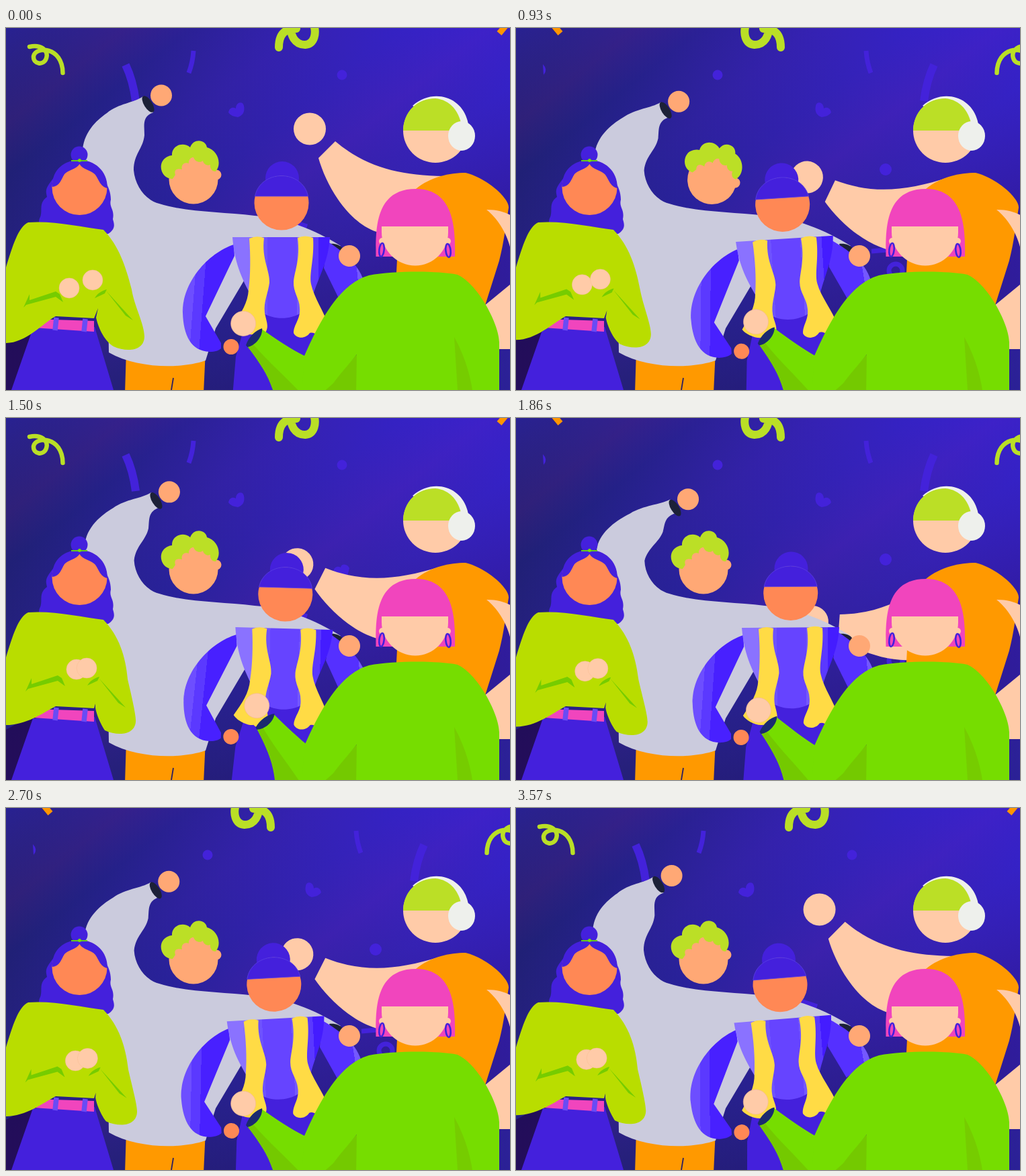
These frames come from a looping animation (750 by 540 pixels, 3.6 s). An HTML page:

```html
<!DOCTYPE html>
<html lang="en">
<head>
<meta charset="utf-8">
<title>Party crowd</title>
<style>
  html, body { margin: 0; width: 100%; height: 100%; overflow: hidden; background: #2c218c; }
  svg { display: block; width: 750px; height: 540px; }
</style>
</head>
<body>
<svg viewBox="0 0 750 540">
  <defs>
    <linearGradient id="sky" gradientUnits="userSpaceOnUse" x1="80" y1="400" x2="700" y2="0">
      <stop offset="0" stop-color="#20206c"/>
      <stop offset=".28" stop-color="#26218a"/>
      <stop offset=".5" stop-color="#3121a0"/>
      <stop offset=".75" stop-color="#3722b8"/>
      <stop offset="1" stop-color="#3622d0"/>
    </linearGradient>
    <linearGradient id="rays" gradientUnits="userSpaceOnUse" x1="0" y1="0" x2="540" y2="675">
      <stop offset="0" stop-color="#2c22a0" stop-opacity=".5"/>
      <stop offset=".07" stop-color="#37228a" stop-opacity=".35"/>
      <stop offset=".13" stop-color="#42207a" stop-opacity=".4"/>
      <stop offset=".2" stop-color="#1f2080" stop-opacity=".35"/>
      <stop offset=".32" stop-color="#3322b0" stop-opacity=".3"/>
      <stop offset=".42" stop-color="#2e22c4" stop-opacity=".25"/>
      <stop offset=".52" stop-color="#4b20b8" stop-opacity=".35"/>
      <stop offset=".62" stop-color="#3020a0" stop-opacity=".2"/>
      <stop offset=".8" stop-color="#220850" stop-opacity=".3"/>
      <stop offset="1" stop-color="#1c2070" stop-opacity=".4"/>
    </linearGradient>
    <linearGradient id="vest" gradientUnits="userSpaceOnUse" x1="337" y1="0" x2="482" y2="0"></linearGradient>
    <linearGradient id="sleeveL" gradientUnits="userSpaceOnUse" x1="263" y1="0" x2="341" y2="6"></linearGradient>
    <linearGradient id="sleeveR" gradientUnits="userSpaceOnUse" x1="474" y1="0" x2="534" y2="-6"></linearGradient>
  </defs>

  <rect width="750" height="540" fill="url(#sky)"/>
  <rect width="750" height="540" fill="url(#rays)"/>
  <path fill="#220950" opacity=".8" d="M0 465L45 440V540H0Z"/>

  <g id="confetti" fill="none" stroke-linecap="round">
    <g stroke="#badf26">
      <path stroke-width="6.5" d="M35 28C51 24 64 33 60 45C56 57 40 54 41 42C44 27 84 27 84.5 67"/>
      <path stroke-width="12" d="M406 29C406 10 414 1 432 1M425 -8C421 12 431 25 445 25C459 24 463 8 457 -8"/>
    </g>
    <path stroke="#ff9500" stroke-width="9" stroke-linecap="butt" d="M734 8L744 -4"/>
    <g stroke="#4322da" stroke-linecap="butt">
      <path stroke-width="12" d="M178 55Q189 78 193 109"/>
      <path stroke-width="7" d="M279 34Q278 51 272 67"/>
      <path stroke-width="7" d="M248 331L271 333M424 288L448 296"/>
      <circle cx="235" cy="362" r="10" stroke-width="7"/>
    </g>
    <g fill="#4322da">
      <circle cx="500" cy="70" r="7.5"/>
      <circle cx="250" cy="211" r="9"/>
      <path d="M331 126C332 119 338 117 342 120C342 111 352 108 354 116C356 125 352 131 345 133C338 132 334 130 331 126Z"/>
      <path d="M487 229C488 222 494 220 498 223C499 216 509 218 511 224L508 236H490Z"/>
      <path d="M760 54Q752 62 759 70Z"/>
    </g>
  </g>

  <!-- dancer with headphones -->
  <g id="wave" fill="#ffcba8">
    <path d="M490 169C535 207 585 220 652 221L670 300L575 308C518 308 478 240 465 194Z"/>
    <circle cx="452" cy="150.5" r="24"/>
  </g>
  <path fill="#ff9900" d="M610 240C632 222 660 216 684 216C716 224 749 254 748 268C744 292 741 320 734 347L711 420L700 480H575L582 345C590 310 598 262 610 240Z"/>
  <g fill="#ffcba8">
    <path d="M715 271C732 271 744 275 752 280V337C749 312 733 285 715 271ZM752 381L706 419V479H752Z"/>
    <circle cx="639" cy="153" r="48"/>
  </g>
  <path fill="#eef0ec" d="M605 116C620 102 640 99 655 104C675 110 687 128 689 150H668Z"/>
  <path fill="#bbdf26" d="M591 153C591 125 612 105 639 105C660 107 676 123 679 153Z"/>
  <ellipse cx="678" cy="161" rx="20" ry="22" fill="#eef0ec"/>

  <!-- grey jumper -->
  <path fill="#ff9900" d="M179 480L177 545H294L297 480Z"/>
  <path fill="none" stroke="#2b1f62" stroke-width="1.8" d="M249 522L246 540"/>
  <path id="jumper" fill="#cbcbdd"/>
  <path fill="#1c2138" d="M481 322C490 321 497 324 500 328L496 342L484 334Z"/>
  <g id="fist">
    <ellipse cx="211.5" cy="113.5" rx="6" ry="14" transform="rotate(-32 211.5 113.5)" fill="#1c2138"/>
    <circle cx="231" cy="100.5" r="16" fill="#ffa875"/>
  </g>
  <g id="nod">
    <g fill="#ffa875">
      <circle cx="279" cy="226" r="36.5"/>
      <circle cx="313" cy="219" r="7.5"/>
    </g>
    <path fill="#bbdf26" d="M248 225C233 226 226 207 234 197C237 193 243 190 247 190C246 175 264 169 274 178C279 164 297 166 299 178C315 182 322 203 312 214C305 214 303 207 304 204C298 207 293 201 293 198C288 202 281 199 279 193C275 192 271 198 272 202C265 199 260 205 262 211C252 208 250 214 252 219Z"/>
  </g>

  <!-- girl clapping -->
  <g fill="#4420dc">
    <circle cx="109" cy="189" r="12.5"/>
    <path d="M72 222C60 238 58 240 61 252C47 262 56 274 50 284C46 294 54 300 60 306L152 307C165 299 160 290 159 285C162 270 153 268 156 256C156 245 152 236 148 230Z"/>
    <path d="M40 448L8 540H160L132 446Z"/>
  </g>
  <path fill="#f145bd" d="M40 434L131 437V453L40 447Z"/>
  <path stroke="#6a4bf5" stroke-width="7.5" d="M75 432L73 451M118 434L116 453"/>
  <circle cx="109.5" cy="238" r="41" fill="#ff8855"/>
  <path fill="#4420dc" d="M69 237C68 210 88 197 109.5 197C131 197 151 212 151 239C140 237 138 225 132 218C126 212 114 211 109.5 203C104 211 92 212 87 218C82 226 80 236 69 237Z"/>
  <path stroke="#66c91e" stroke-width="2" d="M97 198H121"/>
  <circle cx="109.5" cy="197.5" r="2.5" fill="#76dd00"/>
  <path id="sweater" fill="#b9dd00"/>
  <path id="foldL" fill="#76cc00" d="M26 417L35 397V406L74 393L80 397L85 409L74 401L30 413Z"/>
  <path id="foldR" fill="#76cc00" d="M132 403C136 396 142 392 150 390L147 396ZM149 392L189 436L178 429Z"/>
  <g fill="#ffcba8" stroke="#f6bd93" stroke-width=".5">
    <circle id="handL" r="15"/>
    <circle id="handR" r="15"/>
  </g>

  <!-- dancer in purple -->
  <g id="sway">
    <path fill="#4420dc" d="M370 395H458L482 470L525 550H337L342 490L352 455Z"/>
    <path fill="url(#sleeveR)" d="M478 318C505 335 530 358 534 385L497 407L473 358Z"/>
    <path fill="url(#sleeveL)" d="M339 323C300 336 262 380 263 425C264 458 275 482 303 483C311 483 317 481 320 478V470L297 430L340 340Z"/>
    <circle cx="335" cy="475.5" r="11.5" fill="#ff8855"/>
    <path fill="url(#vest)" d="M337 312H482C480 350 464 372 456 402C446 443 375 443 366 402C350 372 340 350 337 312Z"/>
    <g fill="#ffdb45">
      <path d="M362 314Q372 309 384 313C380 345 393 362 392 380C390 396 383 408 385 425C388 440 392 446 385 456C379 464 372 461 368 457C358 459 342 450 338 443C350 425 360 410 361 390C364 368 364 340 362 314Z"/>
      <path d="M434 313Q445 308 457 313C459 345 451 365 454 382C458 402 474 424 480 445L474 461C466 463 460 452 452 455C446 464 432 464 428 455C428 442 439 434 437 417C437 404 427 394 428 378C430 360 438 345 434 313Z"/>
    </g>
    <circle cx="411" cy="224" r="25" fill="#4420dc"/>
    <circle cx="410" cy="261" r="40.5" fill="#ff8855"/>
    <path fill="#4420dc" stroke="#5a3fe4" stroke-width=".8" d="M370.500 251C374 232 391 220.500 410 220.500C429 220.500 446 232 449.500 251Z"/>
  </g>
  <circle cx="511" cy="340" r="16" fill="#ffa875"/>

  <!-- dancer in green -->
  <g id="forearm">
    <path fill="#74c900" d="M359 475C378 500 392 520 400 550H490L470 500L370 466Z"/>
    <path fill="#76dd00" d="M380 449C402 464 424 479 444 489L475 503L480 560L452 560C426 528 396 505 366 470Z"/>
    <path fill="#1b2a70" d="M381 448C382 460 371 474 359 476L357 473C361 461 371 451 381 448Z"/>
    <circle cx="353" cy="441" r="18.5" fill="#ffcba8" stroke="#f3b78f" stroke-width=".6"/>
  </g>
  <path fill="#74c900" d="M474 540L522 487L523 540Z"/>
  <path fill="#76dd00" d="M444 489C472 425 500 381 540 369C580 362 640 362 672 368C704 383 735 445 734 470V545H521L522 487C510 502 497 516 487 530L470 545H440Z"/>
  <path fill="#76cc00" d="M667 461C682 488 690 515 694 540H672Z"/>
  <g id="pink">
    <path fill="#f145bd" d="M550.500 341C550 300 549 240 610 240C667 240 669 300 668 341Z"/>
    <g fill="#ffcba8">
      <path d="M559 296H658V305C658 332 636 354.500 609 354.500C582 354.500 559 332 559 305Z"/>
      <circle cx="560" cy="318" r="5"/>
      <circle cx="657" cy="318" r="5"/>
    </g>
    <g fill="none" stroke="#4420dc" stroke-width="2.6">
      <ellipse cx="559" cy="331" rx="3.6" ry="10" transform="rotate(6 559 331)"/>
      <ellipse cx="658" cy="332" rx="3.6" ry="10" transform="rotate(-6 658 332)"/>
    </g>
  </g>
</svg>
<script>
(() => {
  const LOOP = 3600;
  const $ = id => document.getElementById(id);
  const set = (id, attrs) => { for (const k in attrs) $(id).setAttribute(k, attrs[k]); };
  const pose = (id, transform) => set(id, { transform });
  const ease = s => (1 - Math.cos(Math.PI * s)) / 2;

  // Hard-edged stripes: [colour, end offset]
  function stripes(id, list) {
    let from = 0;
    $(id).innerHTML = list.map(([color, to]) => {
      const s = `<stop offset="${from}" stop-color="${color}"/><stop offset="${to}" stop-color="${color}"/>`;
      from = to;
      return s;
    }).join('');
  }
  stripes('vest', [['#8a72ff', .2], ['#6e52ff', .36], ['#6644ff', .66], ['#7458ff', .8], ['#5a38ff', .88], ['#441cff', 1]]);
  stripes('sleeveL', [['#8a72ff', .22], ['#7a5dff', .42], ['#6d4eff', .6], ['#5b39ff', .78], ['#4820ff', 1]]);
  stripes('sleeveR', [['#5530ff', .2], ['#7458ff', .5], ['#684aff', .72], ['#7e66ff', 1]]);

  // Eased interpolation through [time, value] steps
  function track(steps, t) {
    for (let i = 1; i < steps.length; i++) {
      const [t0, a] = steps[i - 1], [t1, b] = steps[i];
      if (t <= t1) return a + (b - a) * ease((t - t0) / (t1 - t0));
    }
    return steps[steps.length - 1][1];
  }
  const SWAY = [[0, 0], [390, -3], [930, -3.7], [1500, 1.6], [2220, -2.3], [2700, -3.1], [3570, -4.7], [3600, -4.7]];
  const NOD = [[0, 0], [400, 18], [930, 19], [1520, 0]];
  const LEAN = [[0, 0], [200, 0], [390, 3], [600, 0], [2000, 0], [2200, 1.2], [2420, 0]];

  // The raised arm bends: points near the cuff travel furthest
  function jumperPath(k) {
    const at = (x, y) => {
      const w = k * Math.max(0, (218 - y) / 115);
      return `${(x + 20 * w).toFixed(1)} ${(y + 15.5 * w).toFixed(1)} `;
    };
    const curve = (...p) => {
      let d = 'C';
      for (let i = 0; i < p.length; i += 2) d += at(p[i], p[i + 1]);
      return d;
    };
    return 'M153 484L150 300L118 215L' + at(114, 188) +
      curve(113, 158, 134, 138, 150, 127) + curve(168, 112, 190, 112, 204, 102) +
      'L' + at(219, 126) + curve(202, 132, 206, 146, 206, 160) +
      curve(204, 180, 190, 188, 190, 212) + curve(192, 236, 208, 257, 228, 262) +
      'C270 275 320 274 370 280C415 283 460 301 498 325L484 336L370 350L312 448L297 496C260 509 195 508 153 484Z';
  }

  // Elbows draw in as the hands meet
  function sweaterPath(k) {
    const x = 206 - 13 * k, y = 460 - 9 * k, low = 470 - 12 * k;
    return `M33 290C70 287 112 297 145 301C168 325 178 355 ${187 - 6 * k} 390` +
      `C${191 - 4 * k} 415 ${x} 442 ${x} ${y}C${x} ${y + 22} ${x - 26} ${y + 24} ${x - 46} ${y + 15}` +
      `C${148 - 3 * k} ${468 - 5 * k} ${138 - 3 * k} ${450 - 4 * k} ${134 - k} 432L${137 - 4 * k} ${418 + 8 * k}L131 433L74 430` +
      `C55 440 30 ${low} 0 ${low}L-20 ${low}V400L0 357C10 325 18 297 33 290Z`;
  }

  function draw(t) {
    pose('confetti', Math.floor(t / 240) % 2 ? 'translate(800 0) scale(-1 1)' : 'translate(0 0)');

    const p = t % 1200;
    const wave = 41 * ease(p < 645 ? p / 645 : (1200 - p) / 555);
    pose('wave', `rotate(${-wave} 652 242)`);

    const bend = 1.27 * ease(t / 605);
    set('jumper', { d: jumperPath(bend) });
    pose('fist', `translate(${20 * bend} ${16.5 * bend})`);
    pose('nod', `rotate(${track(NOD, t)} 284 264)`);

    const c = t / 413 % 1;
    const clap = c < .64 ? c / .64 : (1 - c) / .36;
    set('sweater', { d: sweaterPath(clap) });
    set('handL', { cx: 94 + 11 * clap, cy: 388 - 13 * clap });
    set('handR', { cx: 129 - 9 * clap, cy: 376 - 3 * clap });
    pose('foldL', `translate(${3 * clap} ${-9 * clap})`);
    pose('foldR', `translate(${-11 * clap} ${-4 * clap})`);

    const a = track(SWAY, t);
    pose('sway', `translate(0 ${2 * Math.min(1, Math.abs(a) / 1.5)}) rotate(${a} 410 468)`);

    const b = t / 450 % 1;
    pose('forearm', `rotate(${30 * Math.min(b, 1 - b)} 430 550)`);
    pose('pink', `translate(${track(LEAN, t)} 0)`);
  }

  function tick(now) {
    draw(now % LOOP);
    requestAnimationFrame(tick);
  }
  draw(0);
  requestAnimationFrame(tick);
})();
</script>
</body>
</html>
```
